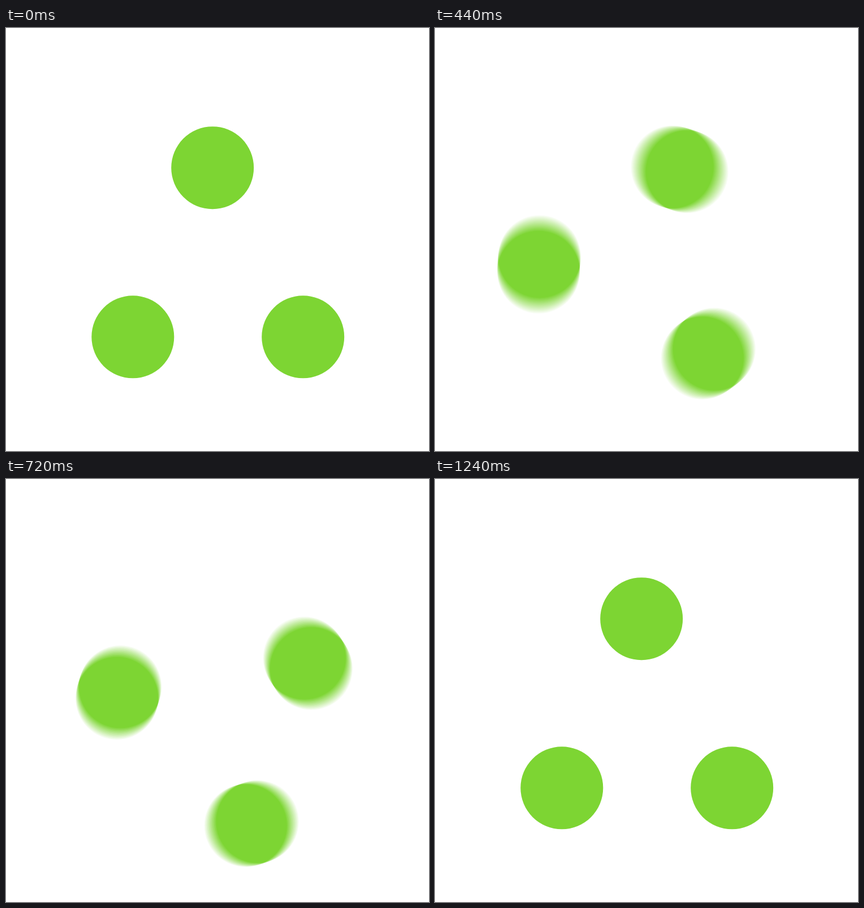
Animation, 748 px wide and 748 px high, one loop 2.64 s. Source, as an HTML page with a canvas:

```html
<!DOCTYPE html>
<html lang="en">
<head>
<meta charset="utf-8">
<title>Spinning dots</title>
<style>
  html, body { margin: 0; width: 100%; height: 100%; overflow: hidden; background: #fff; }
  canvas { display: block; width: 748px; height: 748px; }
</style>
</head>
<body>
<canvas id="stage" width="748" height="748"></canvas>
<script>
const ctx = document.getElementById('stage').getContext('2d');
const SIZE = 748, LOOP = 2640, STEP = 40;
const SHUTTER = 16.7, SAMPLES = 17;
const GREEN = '#7dd533', RADIUS = 73;
const PIVOT = [374, 429.8];
const DOTS = [[365.2, 247.2], [224.3, 546.3], [525.2, 546.3]];

// One eased turn: time in ms, angle in degrees, speed in degrees per ms
const TURN = [
  [0, 0, 0],
  [160, 21.8, 0.2794],
  [320, 85.1, 0.4779],
  [520, 188.8, 0.5395],
  [720, 289.4, 0.4288],
  [880, 342.3, 0.2237],
  [1040, 360, 0]
];

function angleAt(t) {
  if (t <= 0) return 0;
  const i = TURN.findIndex(key => t < key[0]);
  if (i < 0) return 360;
  const [t0, a0, v0] = TURN[i - 1], [t1, a1, v1] = TURN[i];
  const h = t1 - t0, u = (t - t0) / h, w = 1 - u;
  return a0 * w * w * (1 + 2 * u) + a1 * u * u * (3 - 2 * u)
       + h * u * w * (v0 * w - v1 * u);
}

function addDots(degrees) {
  const a = degrees * Math.PI / 180, c = Math.cos(a), s = Math.sin(a);
  ctx.beginPath();
  for (const [px, py] of DOTS) {
    const dx = px - PIVOT[0], dy = py - PIVOT[1];
    const x = PIVOT[0] + dx * c - dy * s;
    const y = PIVOT[1] + dx * s + dy * c;
    ctx.moveTo(x + RADIUS, y);
    ctx.arc(x, y, RADIUS, 0, Math.PI * 2);
  }
  ctx.fill();
}

function draw(t) {
  ctx.globalCompositeOperation = 'source-over';
  ctx.globalAlpha = 1;
  ctx.clearRect(0, 0, SIZE, SIZE);
  ctx.fillStyle = GREEN;
  if (t === 0 || t >= 1040) {
    addDots(0);
    return;
  }
  // Motion blur: sum coverage over the shutter, then tint it
  ctx.globalCompositeOperation = 'lighter';
  ctx.globalAlpha = 1 / SAMPLES;
  for (let i = 0; i < SAMPLES; i++) {
    addDots(angleAt(t + SHUTTER * ((i + 0.5) / SAMPLES - 0.5)));
  }
  ctx.globalCompositeOperation = 'source-in';
  ctx.globalAlpha = 1;
  ctx.fillRect(0, 0, SIZE, SIZE);
}

let start = null, shown = -1;
function tick(now) {
  if (start === null) start = now;
  const t = Math.floor(((now - start) % LOOP) / STEP) * STEP;
  if (t !== shown) draw(shown = t);
  requestAnimationFrame(tick);
}
draw(0);
requestAnimationFrame(tick);
</script>
</body>
</html>
```
